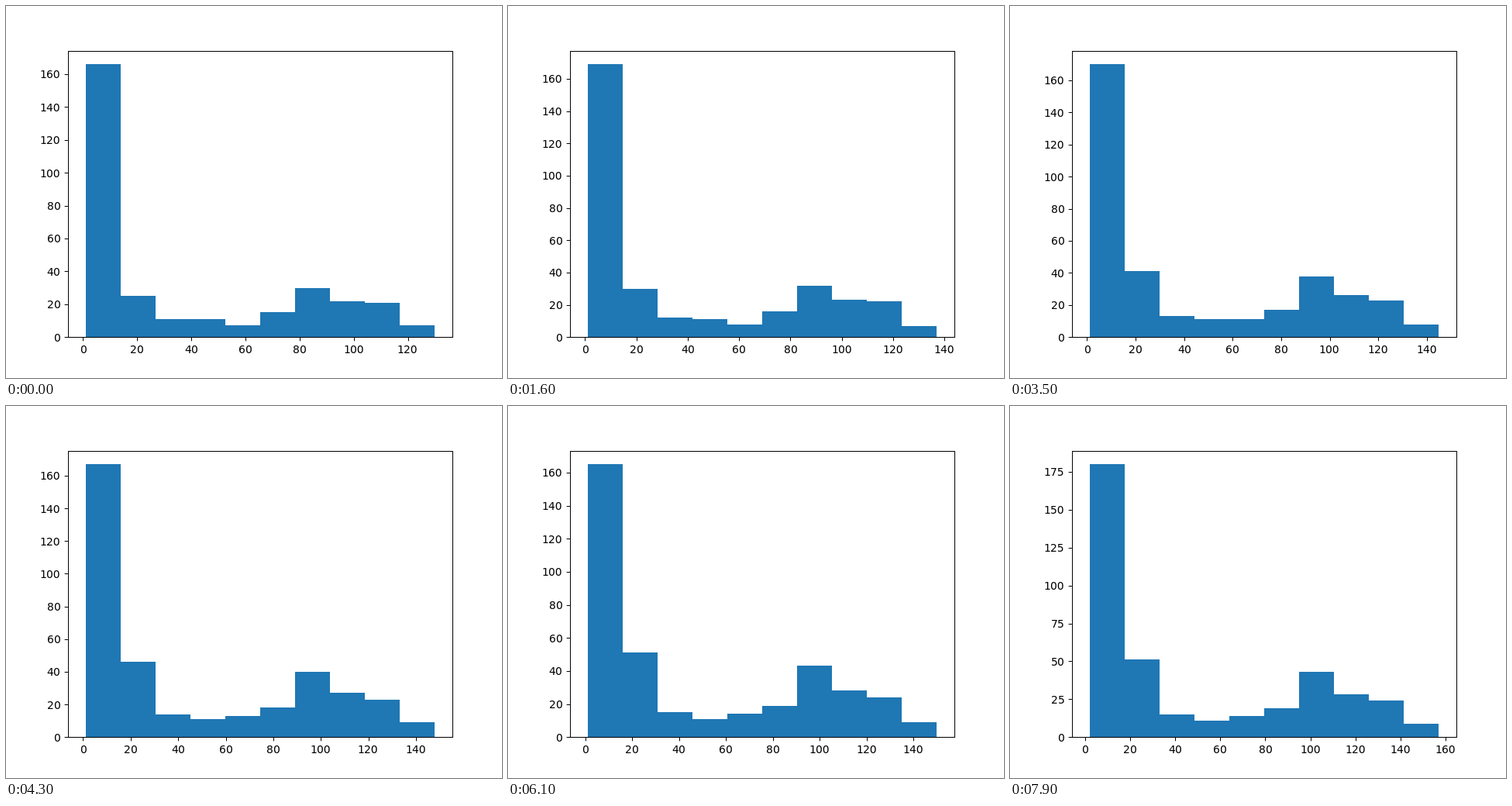
Recreate the animation shown at these times as an HTML page with a canvas. Size 640 px wide and 480 px high, loop 8000 ms.

```html
<!DOCTYPE html>
<html lang="en">
<head>
<meta charset="utf-8">
<title>Histogram</title>
<style>
html, body { margin: 0; width: 100%; height: 100%; overflow: hidden; background: #fff; }
canvas { display: block; }
</style>
</head>
<body>
<canvas id="stage" width="640" height="480"></canvas>
<script>
const ctx = document.getElementById('stage').getContext('2d');
const LOOP = 8000, STEP = 100;
const LEFT = 80, RIGHT = 576, TOP = 57.6, BASE = 427.2;
const barLeft = LEFT + (RIGHT - LEFT) / 22;
const barSpan = (RIGHT - LEFT) / 1.1;
const barRise = (BASE - TOP) / 1.05;

// Key points: [step, value]
const highest = [[0, 130], [8, 132], [23, 142], [51, 150], [61, 150], [79, 157]];
const peak = [[0, 166], [8, 171], [12, 168], [23, 172], [35, 170], [53, 163],
  [61, 165], [63, 173], [79, 180]];

// Every bar but the first eases from one shape to the other
const early = [25, 11, 11, 7, 15, 30, 22, 21, 7];
const late = [51, 15, 11, 14, 19, 43, 28, 24, 9];

// Digit spacing and the blank left of each digit, in pixels
const ADVANCE = 8.875, INK = 7.9;
const bearing = [0.88, 1.5, 1, 1, 0.63, 1.5, 1, 1.13, 1, 1];

const mix = (a, b, u) => a + (b - a) * u;
const snap = v => Math.round(v) + 0.5;

function along(keys, k) {
  const i = Math.max(1, keys.findIndex(key => key[0] >= k));
  const [k0, v0] = keys[i - 1], [k1, v1] = keys[i];
  return Math.round(mix(v0, v1, (k - k0) / (k1 - k0)));
}

function smooth(u) {
  u = Math.min(1, u);
  return u * u * (3 - 2 * u);
}

function line(x1, y1, x2, y2) {
  ctx.beginPath();
  ctx.moveTo(x1, y1);
  ctx.lineTo(x2, y2);
  ctx.stroke();
}

// Digits sit on whole pixels; a fractional first bearing pulls the rest left
function label(value, x, y, align) {
  const digits = [...String(value)];
  const gap = bearing[digits[0]];
  const width = (digits.length - 1) * ADVANCE + INK - gap;
  const start = Math.round(x - width * align) - Math.floor(gap);
  const pull = gap % 1 ? 1 : 0;
  digits.forEach((d, i) => {
    ctx.fillText(d, start + i * ADVANCE - (i ? pull : 0), Math.round(y));
  });
}

function draw(k) {
  const min = k < 76 ? 1 : 2;
  const max = along(highest, k);
  const ease = smooth(k / 60);
  const counts = [along(peak, k), ...early.map((v, i) => Math.round(mix(v, late[i], ease)))];
  const sx = barSpan / (max - min);
  const sy = barRise / counts[0];
  const floor = Math.round(BASE);

  ctx.fillStyle = '#fff';
  ctx.fillRect(0, 0, 640, 480);

  ctx.fillStyle = '#1f77b4';
  counts.forEach((count, i) => {
    const x1 = Math.round(barLeft + barSpan * i / counts.length);
    const x2 = Math.round(barLeft + barSpan * (i + 1) / counts.length);
    const y = Math.round(BASE - count * sy);
    ctx.fillRect(x1, y, x2 - x1, floor - y);
  });

  ctx.strokeStyle = ctx.fillStyle = '#000';
  ctx.lineWidth = 1;
  ctx.font = '13.889px "DejaVu Sans", sans-serif';
  ctx.strokeRect(snap(LEFT), snap(TOP), RIGHT - LEFT, floor - Math.round(TOP));

  const xEnd = max + (max - min) / 20;
  for (let v = 0; v <= xEnd; v += 20) {
    const x = barLeft + (v - min) * sx;
    line(snap(x), floor + 0.5, snap(x), floor + 5.36);
    label(v, x, 448, 0.5);
  }

  const yEnd = counts[0] * 1.05;
  const gap = yEnd > 180 ? 25 : 20;
  for (let v = 0; v <= yEnd; v += gap) {
    const y = BASE - v * sy;
    line(LEFT + 0.5, snap(y), LEFT - 4.36, snap(y));
    label(v, LEFT - 10.6, y + 5.5, 1);
  }
}

const start = performance.now();
let shown = -1;

function tick() {
  const k = Math.floor((performance.now() - start) % LOOP / STEP);
  if (k !== shown) draw(shown = k);
  requestAnimationFrame(tick);
}
tick();
</script>
</body>
</html>
```
